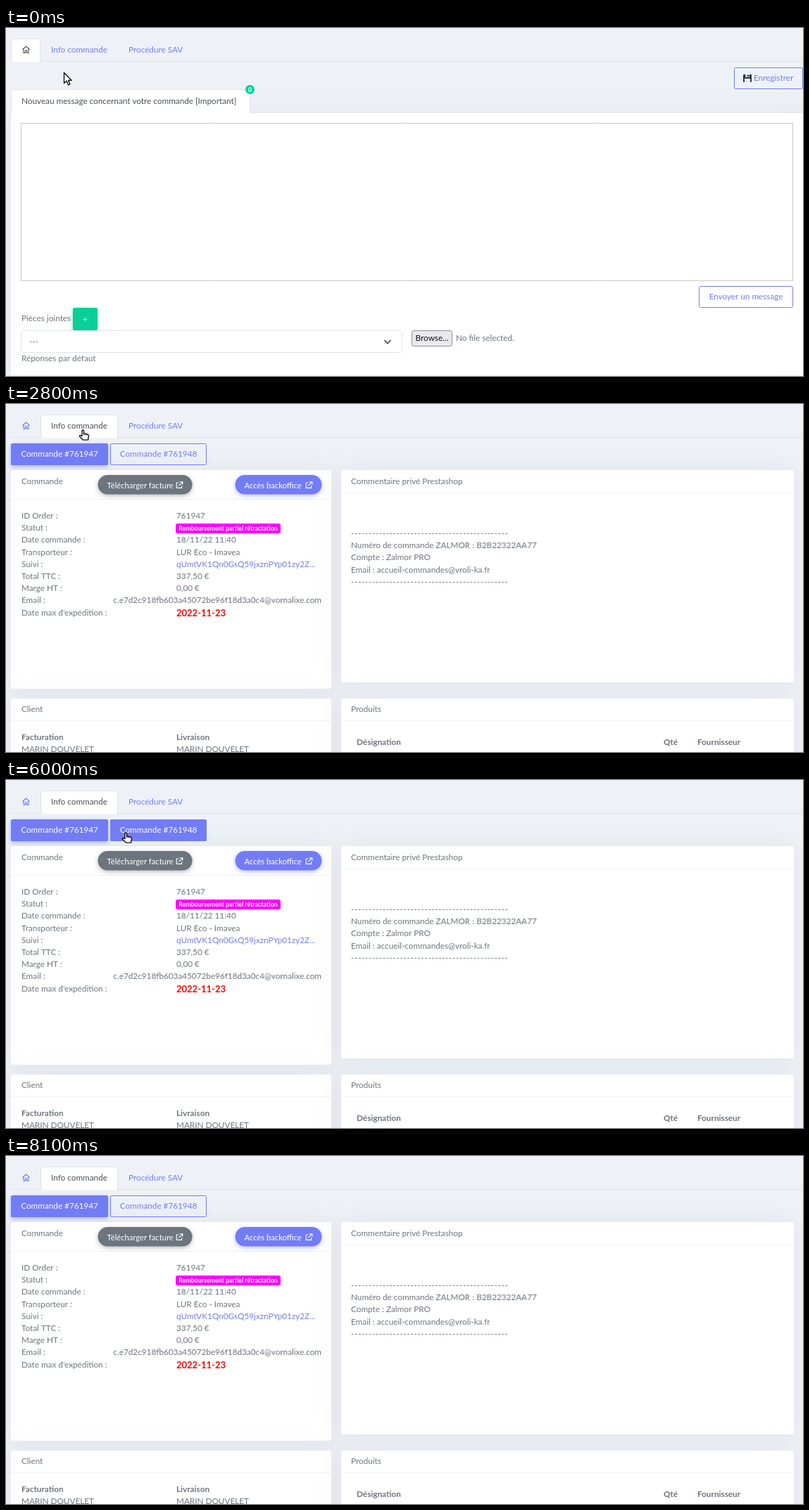
Write an HTML page with a canvas that moves like this. It is 1132 by 495 pixels and loops after 8.4 s.

```html
<!DOCTYPE html>
<html lang="fr">
<head>
<meta charset="utf-8">
<title>Info commande</title>
<style>
html, body { margin: 0; width: 100%; height: 100%; overflow: hidden; background: #eef2f7; }
canvas { display: block; }
</style>
</head>
<body>
<canvas id="stage" width="1132" height="495"></canvas>
<script>
const ctx = document.getElementById('stage').getContext('2d');
const LOOP = 8400, STEP = 100;
const BLUE = '#727cf5', GREY = '#6c757d', DARK = '#495057', GREEN = '#0acf97', LINE = '#dee2e6';
const LOAD = 900, READY = 1900;

const HAND = new Path2D('M4.5 9V1.8a1.3 1.3 0 0 1 2.6 0V5.5l5 .9q1.9.4 1.9 2.2l-.8 4v2H5.8L1 9.8q-.5-1.4 1-1.6z');
const KNUCKLES = new Path2D('M7.1 5.5V8M9.4 6V8.2M11.7 6.5V8.4');
const ARROW = new Path2D('M0 0V15l3.5-3.2L6 17.5l2.4-1.1L6 11h4.6z');
const HOME = new Path2D('M.5 5.5L5.5 1l5 4.5M2 4.7V10.4H4.4V6.8H6.6V10.4H9V4.7');
const LINK = new Path2D('M4.5 2H1.2V9.4H8.6V6M6 .8H9.8V4.6M9.6 1L4.4 6.2');

// Pointer stops: time, x, y
const PATH = [
  [200, 82, 63], [300, 84, 56], [400, 87, 44], [500, 90, 35], [600, 91, 32],
  [2700, 91, 32], [2800, 108, 37], [3000, 148, 50], [3100, 163, 60], [3300, 173, 68],
  [4300, 173, 68], [4400, 160, 69], [4600, 110, 72], [4800, 89, 72],
  [5300, 89, 72], [5700, 146, 75], [5900, 165, 76], [6100, 172, 74],
  [6600, 172, 74], [6700, 140, 110], [6800, 90, 162], [7000, 90, 162],
  [7200, 90, 115], [7400, 90, 76], [7700, 90, 74], [7800, 90, 66], [7900, 90, 40], [8000, 88, 6]
];

function pointer(t) {
  let a = PATH[0];
  for (const b of PATH) {
    if (t <= b[0]) {
      const k = b === a ? 0 : (t - a[0]) / (b[0] - a[0]);
      return [a[1] + (b[1] - a[1]) * k, a[2] + (b[2] - a[2]) * k];
    }
    a = b;
  }
  return null;
}

// A value that flips between 0 and 1 at each time, with a 150 ms ease
function flips(t, start, ...times) {
  let goal = start, v = start;
  for (const at of times) {
    if (t < at) break;
    goal = 1 - goal;
    const k = Math.min(1, (t - at) / 150);
    v += (goal - v) * k * k * (3 - 2 * k);
  }
  return v;
}

function mix(a, b, k) {
  return `rgb(${a.map((v, i) => Math.round(v + (b[i] - v) * k))})`;
}

function text(str, x, y, color = GREY, { size = 11.75, weight = 400, align = 'left' } = {}) {
  ctx.font = `${weight} ${size}px Lato, "Open Sans", sans-serif`;
  ctx.fillStyle = color;
  ctx.textAlign = align;
  if (!str.includes('-----')) return ctx.fillText(str, x, y);
  for (const part of str.split(/(-{3,})/)) {
    ctx.letterSpacing = part.startsWith('---') ? '0.6px' : '0px';
    ctx.fillText(part, x, y);
    x += ctx.measureText(part).width;
  }
  ctx.letterSpacing = '0px';
}

function shadow(color, blur, dy = 0) {
  ctx.shadowColor = color;
  ctx.shadowBlur = blur;
  ctx.shadowOffsetY = dy;
}

function box(x, y, w, h, r, fill, stroke) {
  ctx.beginPath();
  ctx.roundRect(x, y, w, h, r);
  if (fill) { ctx.fillStyle = fill; ctx.fill(); }
  shadow('transparent', 0);
  if (stroke) {
    ctx.beginPath();
    ctx.roundRect(x + .5, y + .5, w - 1, h - 1, r);
    ctx.strokeStyle = stroke;
    ctx.lineWidth = 1;
    ctx.stroke();
  }
}

function rule(x, y, w, color) {
  ctx.fillStyle = color;
  ctx.fillRect(x, y, w, 1);
}

function icon(path, x, y, color, width = 1.1) {
  ctx.save();
  ctx.translate(x, y);
  ctx.strokeStyle = color;
  ctx.lineWidth = width;
  ctx.stroke(path);
  ctx.restore();
}

function card(x, y, w, h, r = 3) {
  shadow('rgba(154,161,171,.15)', 35);
  box(x, y, w, h, r, '#fff');
}

function openTab(x, y, w, h) {
  box(x, y, w, h + 4, [3, 3, 0, 0], '#fff', LINE);
}

function tabs(t) {
  const info = t >= LOAD;
  rule(7, 47, 1125, LINE);
  ctx.save();
  ctx.beginPath();
  ctx.rect(0, 0, 1132, 48);
  ctx.clip();
  if (info) openTab(49, 15, 110, 33);
  else openTab(7, 15, 42, 33);
  ctx.restore();
  icon(HOME, 23, 25, info ? BLUE : DARK);
  const hover = mix([114, 124, 245], [60, 72, 215], flips(t, 0, 450));
  text('Info commande', 64, 35, info ? DARK : hover);
  text('Procédure SAV', 174, 35, BLUE);
}

function floppy(x, y) {
  box(x, y, 12, 11, 1, '#2f3542');
  box(x + 3, y, 6, 4, 0, '#c9ced6');
  box(x + 6, y + 1, 2, 2, 0, '#2f3542');
  box(x + 2, y + 6, 8, 5, 0, '#eef0f4');
}

function messagePage(dy) {
  ctx.save();
  ctx.translate(0, dy);
  card(7, 121, 1140, 373, 0);
  rule(7, 120, 1125, LINE);
  ctx.save();
  ctx.beginPath();
  ctx.rect(0, 80, 1132, 41);
  ctx.clip();
  openTab(7, 87, 340, 34);
  ctx.restore();
  text('Nouveau message concernant votre commande [Important]', 22, 108, DARK);
  box(340, 81, 13, 13, 6.5, GREEN);
  text('0', 346.5, 91, '#fff', { size: 9, weight: 700, align: 'center' });

  box(1034, 56, 98, 31, 2, null, BLUE);
  floppy(1047, 66);
  text('Enregistrer', 1062, 75, BLUE);

  box(21, 135, 1097, 225, 0, '#fff', '#c6c6c6');
  box(984, 367, 134, 31, 2, '#fff', BLUE);
  text('Envoyer un message', 1051, 386, BLUE, { align: 'center' });

  text('Pièces jointes', 22, 417);
  shadow('rgba(10,207,151,.5)', 6, 2);
  box(95, 398, 35, 32, 2, GREEN);
  text('+', 112.5, 418, '#fff', { align: 'center' });

  box(21, 430, 542, 32, 3, '#fff', LINE);
  text('---', 33, 450);
  ctx.beginPath();
  ctx.moveTo(537.5, 444);
  ctx.lineTo(542, 448.7);
  ctx.lineTo(546.5, 444);
  ctx.strokeStyle = '#343a40';
  ctx.lineWidth = 1.6;
  ctx.stroke();

  box(576, 430, 58, 23, 3, '#e9e9ed', '#8f8f9d');
  text('Browse...', 605, 445, '#111', { align: 'center' });
  text('No file selected.', 639, 445);
  text('Réponses par défaut', 22, 474);
  ctx.restore();
}

function spinner(t) {
  const turn = Math.PI / 4 + (t - 1800) / 750 * Math.PI * 2;
  ctx.beginPath();
  ctx.arc(570, 84.5, 13, turn + Math.PI / 4, turn + Math.PI * 7 / 4);
  ctx.strokeStyle = BLUE;
  ctx.lineWidth = 3;
  ctx.stroke();
}

function orderButton(x, w, label, fill, dark, glow) {
  const shade = mix([114, 124, 245], [97, 105, 208], dark);
  ctx.save();
  ctx.globalAlpha = fill;
  shadow(`rgba(114,124,245,${.5 * glow})`, 6, 2);
  box(x, 56, w, 31, 2, shade);
  ctx.restore();
  box(x, 56, w, 31, 2, null, shade);
  text(label, x + w / 2, 75, mix([114, 124, 245], [255, 255, 255], fill), { align: 'center' });
}

function pill(x, w, label, color, glow) {
  shadow(glow, 6, 2);
  box(x - .5, 101, w + 1, 27.5, 13.75, color);
  text(label, x + 12.5, 120, '#fff', { size: 11.2 });
  icon(LINK, x + w - 23, 110, '#fff');
}

const dash = n => '-'.repeat(n);
const ORDERS = [
  {
    id: '761947', carrier: 'LUR Eco - Imavea', track: 'qUmtVK1Qn0GsQ59jxznPYp01zy2Z...', total: '337,50 €',
    qty: 934, supplier: 982,
    notes: [dash(45), 'Numéro de commande ZALMOR : B2B22322AA77', 'Compte : Zalmor PRO',
      'Email : accueil-commandes@vroli-ka.fr', dash(45)]
  },
  {
    id: '761948', carrier: 'Jelvo Eco (13)', track: 'R5186002_1', total: '316,62 €',
    qty: 905, supplier: 964,
    notes: ['-------- 18/11/2022 11:54:05--------', 'Numéro de dossier TELVAR ARO : 6450063', dash(45), '',
      '-------- 22/11/2022 00:33:17--------', 'Numéro de BL TELVAR : R5186002_1', '', dash(45),
      '----- BORNE EXPEDITEUR : 22/11 01h00 -----', 'Transporteur : KRD MOLVAIN',
      'Coordonnées inconnues : veuillez fournir les coordonnées du transporteur aux développeurs via un nouveau ticket.',
      dash(41)]
  }
];
const LABELS = ['ID Order :', 'Statut :', 'Date commande :', 'Transporteur :', 'Suivi :', 'Total TTC :',
  'Marge HT :', 'Email :', "Date max d'expédition :"];

function orderPage(t) {
  const switches = [3800, 5100, 6300, 7500].filter(at => t >= at).length;
  const order = ORDERS[switches % 2];
  const row = i => Math.round(163 + 17.2 * i);
  const bold = { weight: 700 };

  card(7, 94, 455, 311);
  card(476, 94, 643, 302);
  card(7, 419, 455, 120);
  card(476, 419, 643, 120);
  const pale = '#eef2f7';
  rule(7, 135, 455, pale);
  rule(476, 126, 643, pale);
  rule(7, 450, 455, pale);
  rule(476, 450, 643, pale);

  orderButton(7, 138, 'Commande #761947',
    flips(t, 1, 3800, 4450, 6300, 7250),
    flips(t, 0, 5100, 5700, 7500, 7900),
    flips(t, 1, 3800, 5100, 6300, 7500));
  orderButton(148, 137, 'Commande #761948',
    flips(t, 0, 3050, 5100, 5700, 7500),
    flips(t, 0, 3800, 4450, 6300, 6750),
    flips(t, 0, 3800, 5100, 6300, 7500));

  text('Commande', 22, 114);
  pill(131, 133, 'Télécharger facture', GREY, 'rgba(108,117,125,.5)');
  pill(326, 122, 'Accès backoffice', BLUE, 'rgba(114,124,245,.5)');

  LABELS.forEach((label, i) => text(label, 22, row(i)));
  text(order.id, 242, row(0));
  box(241, 170, 149, 14, 3, '#f0f');
  text('Remboursement partiel rétractation', 315.5, 180, '#fff', { size: 8.8, weight: 700, align: 'center' });
  text('18/11/22 11:40', 242, row(2));
  text(order.carrier, 242, row(3));
  text(order.track, 242, row(4), BLUE);
  text(order.total, 242, row(5));
  text('0,00 €', 242, row(6));
  text('c.e7d2c918fb603a45072be96f18d3a0c4@vornalixe.com', 448, row(7), GREY, { align: 'right' });
  text('2022-11-23', 242, 302, '#f00', { size: 13, weight: 700 });

  text('Commentaire privé Prestashop', 490, 114);
  order.notes.forEach((line, i) => text(line, 490, Math.round(188 + 17.2 * i)));

  text('Client', 22, 438);
  text('Facturation', 22, 478, GREY, bold);
  text('Livraison', 242, 478, GREY, bold);
  text('MARIN DOUVELET', 22, 495);
  text('MARIN DOUVELET', 242, 495);

  text('Produits', 490, 438);
  text('Désignation', 498, 485, GREY, bold);
  text('Qté', order.qty, 485, GREY, bold);
  text('Fournisseur', order.supplier, 485, GREY, bold);
}

function drawPointer(t) {
  const p = pointer(t);
  if (!p) return;
  const x = Math.round(p[0]), y = Math.round(p[1]);
  const onTab = y > 15 && y < 48 && x > 49 && x < 159;
  const onButton = t >= READY && y > 55 && y < 87 && (x < 145 || x > 147) && x < 285;
  const hand = onTab || onButton;
  const shape = hand ? HAND : ARROW;
  ctx.save();
  ctx.translate(hand ? x - 4.5 : x + .5, hand ? y - .5 : y + .5);
  ctx.fillStyle = '#fff';
  ctx.strokeStyle = '#111';
  ctx.lineWidth = 1.4;
  ctx.lineJoin = 'round';
  ctx.fill(shape);
  ctx.stroke(shape);
  if (hand) {
    ctx.lineWidth = .9;
    ctx.stroke(KNUCKLES);
  }
  ctx.restore();
}

function draw(t) {
  ctx.fillStyle = '#eef2f7';
  ctx.fillRect(0, 0, 1132, 495);
  if (t < LOAD) messagePage(0);
  else if (t < READY) {
    messagePage(72);
    spinner(t);
  } else orderPage(t);
  tabs(t);
  drawPointer(t);
}

const start = performance.now();
function tick() {
  const t = (performance.now() - start) % LOOP;
  draw(Math.floor(t / STEP) * STEP);
  requestAnimationFrame(tick);
}
tick();
</script>
</body>
</html>
```
